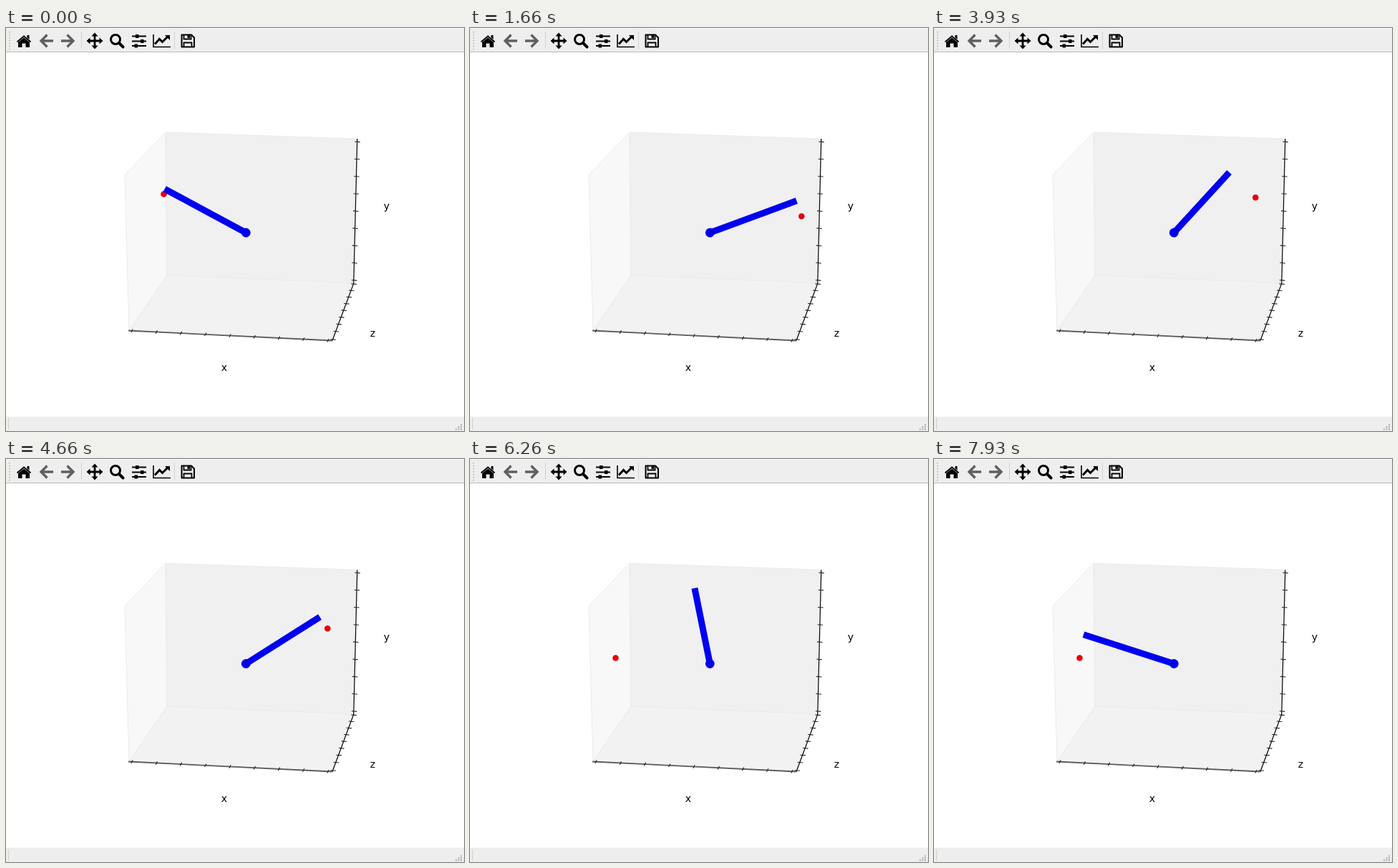
These frames come from a looping animation (640x564 px, 8 s). An HTML page:

```html
<!DOCTYPE html>
<html lang="en">
<head>
<meta charset="utf-8">
<title>Arm reaching a target</title>
<style>
  html, body { margin: 0; width: 100%; height: 100%; overflow: hidden; background: #fff; }
  svg { display: block; width: 100%; height: 100%; }
  text { font: 14px "DejaVu Sans", sans-serif; text-anchor: middle; }
  .line { fill: none; stroke: #000; stroke-width: 2; }
  .pane { stroke: #ebebeb; stroke-width: 1; }
</style>
</head>
<body>
<svg viewBox="0 0 640 564">
  <rect width="640" height="33" fill="#eee"/>
  <path d="M0 .5H640" stroke="#fafafa"/>
  <path d="M0 33.5H640" stroke="#b8b8b8"/>
  <rect y="544" width="640" height="20" fill="#eee"/>
  <path d="M3.5 546V562" stroke="#cfcfcf"/>
  <path d="M105.5 5V29M235.5 5V29" stroke="#d2d2d2"/>
  <path d="M5 5V31" stroke="#bdbdbd" stroke-width="2" stroke-dasharray="1.5 2.5"/>
  <path d="M635 555.5h2M631.500 558.500h2M635 558.500h2M628 561.500h2M631.500 561.500h2M635 561.500h2" stroke="#aaa" stroke-width="2"/>

  <g id="icons">
    <path d="M25 13.500L33 20V27H27.500V21.500H22.500V27H17V20Z"/>
    <path d="M15.500 19.500L25 11.500L34.500 19.500" class="line"/>
    <path d="M29.500 10H32.500V16L29.500 13.500Z"/>
    <g fill="none" stroke="#606060" stroke-width="3.400">
      <path d="M66 18H50M57.500 9.500L49 18L57.500 26.500"/>
      <path d="M77 18H93M85.500 9.500L94 18L85.500 26.500"/>
    </g>
    <path d="M124 10V26M116 18H132" class="line" style="stroke-width:2.800"/>
    <path d="M124 6.500L128.500 11.500H119.500ZM124 29.500L128.500 24.500H119.500ZM112.500 18L117.500 13.500V22.500ZM135.500 18L130.500 13.500V22.500Z"/>
    <circle cx="153" cy="16" r="6.500" class="line" style="stroke-width:3"/>
    <path d="M158 21L163.500 26.500" class="line" style="stroke-width:4;stroke-linecap:round"/>
    <path d="M176 11.500H196M176 18.500H196M176 25H196" class="line" style="stroke-width:1.800"/>
    <path d="M181 9h4.500v5h-4.500zM188 16h4.500v5h-4.500zM179.500 22.500h4.500v5h-4.500z"/>
    <path d="M206 9V26.500H230" class="line" style="stroke-width:1.600"/>
    <path d="M208 22.500L214.500 15.500L218.500 19.500L226 12" class="line" style="stroke-width:3"/>
    <path d="M222 10H229V17Z"/>
    <path d="M245.500 9.500H259L263 13.500V26.500H245.500Z" class="line" style="stroke-linejoin:round"/>
    <path d="M248.500 9V15.500H258.500V9M248.500 27V20.500H259.500V27" class="line" style="stroke-width:1.800"/>
    <path d="M253.500 9h3.500v5h-3.500z"/>
  </g>

  <path class="pane" fill="#f8f8f8" d="M166 206L223 146L225 346L172 424Z"/>
  <path class="pane" fill="#f0f0f0" d="M223 146L490.500 155L485.500 357L225 346Z"/>
  <path class="pane" fill="#f2f2f2" d="M225 346L485.500 357L456 437L172 424Z"/>
  <path d="M171 423.500L456 437.500" class="line" style="stroke:#5c5c5c;stroke-width:1.800"/>
  <path d="M456 437.500L485.800 357.500L490.800 155" class="line" style="stroke-width:1.200"/>
  <path id="ticks" class="line" style="stroke:#222;stroke-width:1.100"/>
  <text x="305" y="480">x</text>
  <text x="532" y="254">y</text>
  <text x="512.500" y="432">z</text>

  <circle id="target" r="4.300" fill="#e4000f"/>
  <path id="rod" stroke="#0000f0" stroke-width="9" fill="none"/>
  <circle cx="335.300" cy="286.500" r="6.400" fill="#0000e8"/>
</svg>
<script>
const LOOP = 8000, STEPS = 120, STEP_MS = LOOP / STEPS;
const PIVOT = { x: 335.3, y: 286.5 };
const byId = id => document.getElementById(id);
const rod = byId('rod'), target = byId('target');

// Angles are degrees from upright; the arm settles from one to the other.
const decay = s => Math.exp(-s);
const dampedDecay = s => (1 + s) * Math.exp(-s);
const reaches = [
  { step: 0, from: -58, to: -59, tau: 545, ease: decay, goal: [220.5, 232.5] },
  { step: 13, from: 35, to: 64.9, tau: 350, ease: decay, goal: [463.3, 263.5] },
  { step: 52, from: 8, to: 54, tau: 545, ease: decay, goal: [449.3, 237.3] },
  { step: 91, from: -1, to: -73, tau: 350, ease: dampedDecay, goal: [203.5, 278.5] }
];

function drawTicks() {
  const mix = (a, b, k) => a + (b - a) * k;
  let d = '';
  for (let i = 0; i < 9; i++) {
    const k = i / 8;
    const x = mix(176, 450, k);
    d += `M${x - 1.2} ${mix(426, 439.5, k)}l2.4 -4.500`;
    d += `M${mix(487.3, 482.8, k)} ${mix(159, 352.8, k)}l7.500 .6`;
    const depth = Math.pow(k, 0.93);
    d += `M${mix(453.5, 482.300, depth)} ${mix(435.700, 358, depth)}l7.500 .6`;
  }
  byId('ticks').setAttribute('d', d);
}

// Slightly skewed ellipse: the arm's circle seen in perspective.
function tipAt(degrees) {
  const a = degrees * Math.PI / 180, sin = Math.sin(a), cos = Math.cos(a);
  const r = 1.012 + 0.014 * sin;
  return { x: PIVOT.x + 134 * r * sin, y: PIVOT.y + r * (6.7 * sin - 105 * cos) };
}

function render(now) {
  const step = Math.min(STEPS - 1, Math.floor((now % LOOP + 7) / STEP_MS));
  const reach = reaches.filter(r => r.step <= step).pop();
  const elapsed = (step - reach.step) * STEP_MS;
  const angle = reach.to + (reach.from - reach.to) * reach.ease(elapsed / reach.tau);
  const tip = tipAt(angle);
  rod.setAttribute('d', `M${PIVOT.x} ${PIVOT.y}L${tip.x} ${tip.y}`);
  target.setAttribute('cx', reach.goal[0]);
  target.setAttribute('cy', reach.goal[1]);
}

const start = performance.now();
function frame() {
  render(performance.now() - start);
  requestAnimationFrame(frame);
}
drawTicks();
frame();
</script>
</body>
</html>
```
